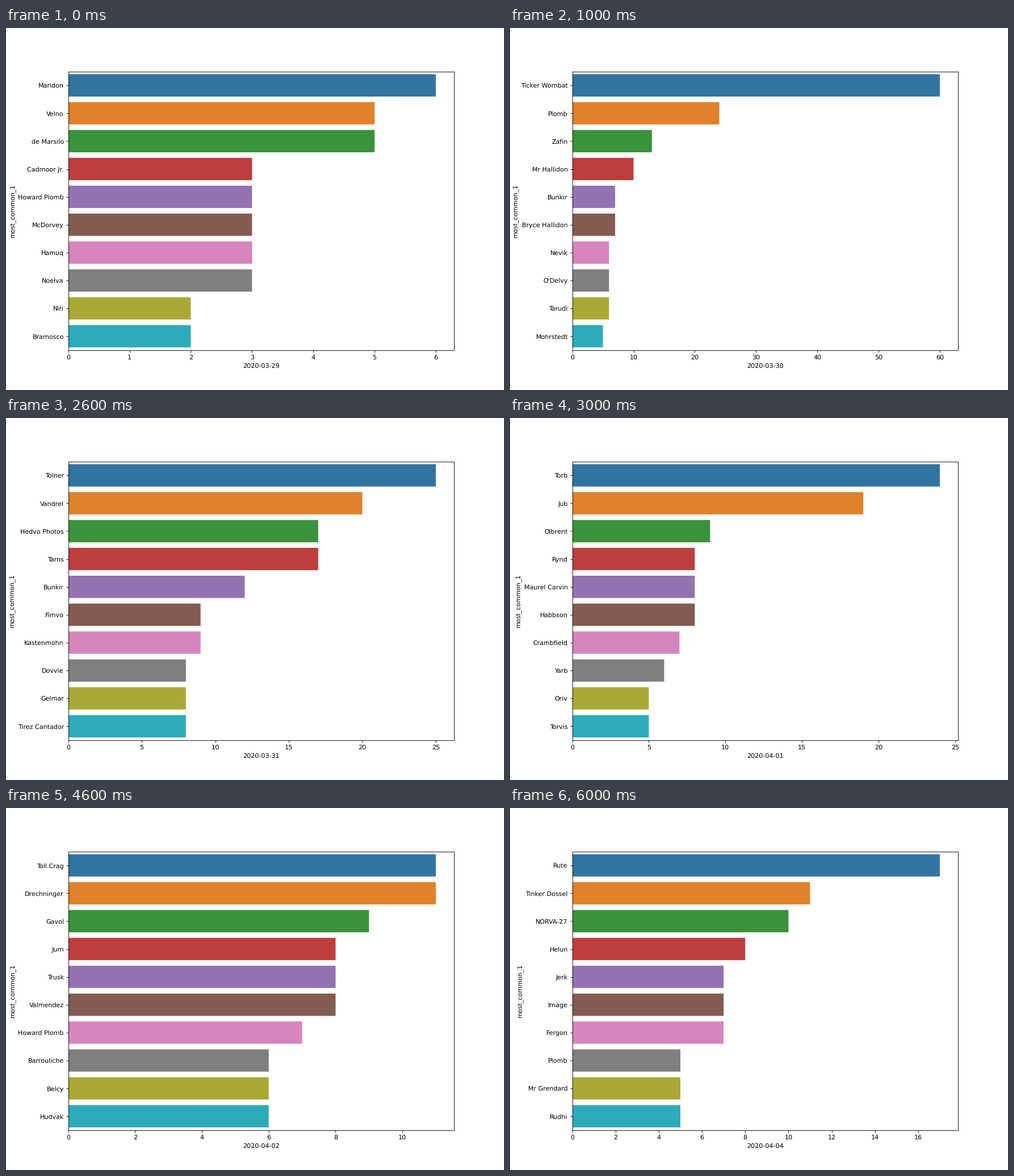
A matplotlib script for the animation above (7 s loop, 877x638 px).

```python
import colorsys

import matplotlib.pyplot as plt
import numpy as np
from matplotlib.animation import FuncAnimation
from matplotlib.colors import to_rgb

FIRST_DAY = np.datetime64("2020-03-29")

# For each day: how often the names were mentioned
MENTIONS = [
    {6: "Maridon", 5: "Velno, de Marsilo",
     3: "Cadmoor Jr., Howard Plomb, McDorvey, Hamuq, Noelva",
     2: "Niri, Bramosco"},
    {60: "Ticker Wombat", 24: "Plomb", 13: "Zafin", 10: "Mr Hallidon",
     7: "Bunkir, Bryce Hallidon", 6: "Nevik, O'Delvy, Tarudi",
     5: "Mohrstedt"},
    {25: "Tolner", 20: "Vandrel", 17: "Hedvo Photos, Tarns", 12: "Bunkir",
     9: "Fimvo, Kastenmohn", 8: "Dovvie, Gelmar, Tirez Cantador"},
    {24: "Torb", 19: "Jub", 9: "Olbrent", 8: "Rynd, Maurel Carvin, Habbson",
     7: "Crambfield", 6: "Yarb", 5: "Oriv, Torvis"},
    {11: "Toll Crag, Drechninger", 9: "Gavol", 8: "Jurn, Trusk, Valmendez",
     7: "Howard Plomb", 6: "Barrouliche, Belcy, Hudvak"},
    {19: "Hedvo Photos", 10: "O'Delvy", 9: "Mrs Holge", 7: "Tiom",
     6: "Dwyl, Chorvan", 5: "Melvona, Rovuto", 4: "Nila Mahfil, Arneck"},
    {17: "Rute", 11: "Tinker Dossel", 10: "NORVA-27", 8: "Helun",
     7: "Jerk, Image, Fergon", 5: "Plomb, Mr Grendard, Rudhi"},
]


def desaturate(color, amount=0.75):
    h, l, s = colorsys.rgb_to_hls(*to_rgb(color))
    return colorsys.hls_to_rgb(h, l, s * amount)


COLORS = [desaturate(f"C{i}") for i in range(10)]

plt.rcParams.update({"font.family": "DejaVu Sans", "text.hinting": "none"})
fig = plt.figure(figsize=(10.997, 8), dpi=79.75)  # 877 x 638 pixels
ax = fig.add_axes([0.125, 0.11, 0.775, 0.77])


def draw(frame):
    bars = [(name, count) for count, group in MENTIONS[frame].items()
            for name in group.split(", ")]
    names, counts = zip(*bars)
    rows = range(len(bars))

    ax.clear()
    ax.barh(rows, counts, height=0.8, color=COLORS, linewidth=0, snap=False)
    ax.set_xlim(0, max(counts) * 1.05)
    ax.set_ylim(len(bars) - 0.5, -0.5)
    ax.set_yticks(rows, names)
    ax.set_xlabel(str(FIRST_DAY + frame))
    ax.set_ylabel("most_common_1")
    return ax.get_children()


anim = FuncAnimation(fig, draw, frames=len(MENTIONS), interval=1000,
                     repeat=True, repeat_delay=0)
plt.show()
```
